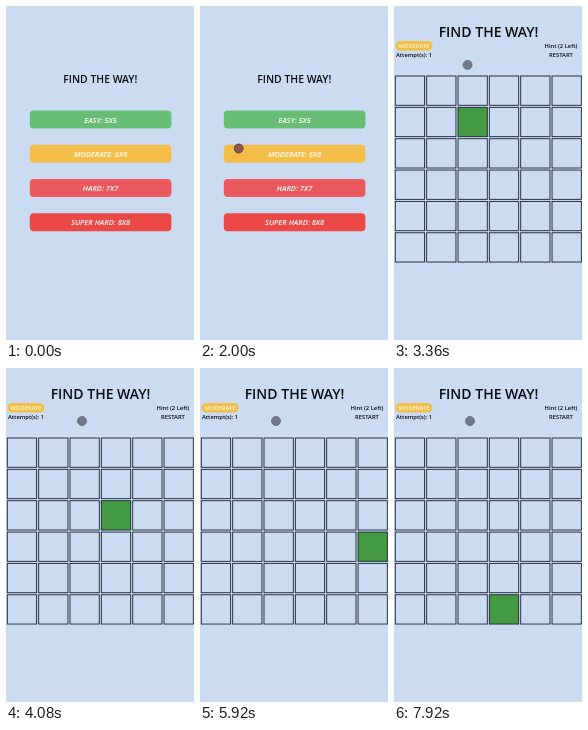
Animation of 188 by 334 pixels, one loop 8 s. Source, as an HTML page:

```html
<!DOCTYPE html>
<html lang="en">
<head>
<meta charset="utf-8">
<title>Find the way</title>
<style>
html, body { margin: 0; width: 100%; height: 100%; overflow: hidden; background: #cbdbf2; }
svg { display: block; width: 100vw; height: 100vh; }
text { font-family: "Open Sans", "Noto Sans", sans-serif; font-weight: 600; fill: #0a0c12; }
.mid { text-anchor: middle; }
.button { font-size: 7.5px; font-style: italic; fill: #fff; }
.small { font-size: 5.8px; }
.badge { fill: #fff6dc; }
.cell { stroke: #1b2230; stroke-width: .9; }
</style>
</head>
<body>
<svg id="stage" viewBox="0 0 188 334">
  <rect width="188" height="334" fill="#cbdbf2"/>
  <g id="menu">
    <text class="mid" x="94.3" y="77.2" font-size="10.4">FIND THE WAY!</text>
  </g>
  <g id="board">
    <text class="mid" x="94.5" y="31" font-size="14">FIND THE WAY!</text>
    <rect x="1.5" y="35" width="37" height="9.6" rx="4.8" fill="#f3bd48"/>
    <text class="mid small badge" x="20" y="42">MODERATE</text>
    <text class="small" x="2" y="51">Attempt(s): 1</text>
    <text class="mid small" x="167" y="42">Hint (2 Left)</text>
    <text class="mid small" x="167" y="51">RESTART</text>
  </g>
  <circle id="cursor" r="4.5" stroke-width=".8"/>
</svg>
<script>
const LOOP = 8000, OPEN = 2080, FIRST = 2500, STEP = 500;
const SIZE = 6, PITCH = 31.35;
const PATH = [[2, 0], [2, 1], [2, 2], [3, 2], [4, 2], [5, 2], [5, 3], [5, 4], [4, 4], [4, 5], [3, 5]];
const LEVELS = [
  ["EASY: 5X5", "#68bd74"],
  ["MODERATE: 6X6", "#f3bd48"],
  ["HARD: 7X7", "#ea5a5c"],
  ["SUPER HARD: 8X8", "#ec4846"]
];
const get = id => document.getElementById(id);
const menu = get("menu"), board = get("board"), cursor = get("cursor");

function add(parent, tag, attrs, label = "") {
  const el = document.createElementNS("http://www.w3.org/2000/svg", tag);
  for (const key in attrs) el.setAttribute(key, attrs[key]);
  el.textContent = label;
  parent.appendChild(el);
  return el;
}

LEVELS.forEach(([label, fill], i) => {
  const y = 104.6 + i * 34.2;
  add(menu, "rect", { x: 23.8, y, width: 141.6, height: 18, rx: 4, fill });
  add(menu, "text", { class: "mid button", x: 94.6, y: y + 12 }, label);
});

const cells = [];
for (let i = 0; i < SIZE * SIZE; i++) {
  const x = 1.3 + (i % SIZE) * PITCH, y = 70 + Math.floor(i / SIZE) * PITCH;
  cells.push(add(board, "rect", { class: "cell", x, y, width: 29.3, height: 29.3 }));
}

// Smooth progress between two times
function ease(t, from, to) {
  const p = Math.min(1, Math.max(0, (t - from) / (to - from)));
  return p * p * (3 - 2 * p);
}
const mix = (a, b, p) => a + (b - a) * p;

function draw(t) {
  const playing = t >= OPEN;
  menu.style.display = playing ? "none" : "";
  board.style.display = playing ? "" : "none";

  const step = Math.min(PATH.length - 1, Math.floor((t - FIRST) / STEP));
  const lit = step < 0 ? -1 : PATH[step][1] * SIZE + PATH[step][0];
  cells.forEach((cell, i) => cell.setAttribute("fill", i === lit ? "#439a43" : "#cbdbf2"));

  const down = ease(t, 960, 1720), away = ease(t, 2720, 3480);
  cursor.style.display = t < 960 ? "none" : "";
  cursor.setAttribute("cx", mix(mix(70, 38.7, down), 76, away));
  cursor.setAttribute("cy", mix(mix(39, 142.5, down), 53, away));
  const overButton = !playing && down > 0.95;
  cursor.setAttribute("fill", overButton ? "#8c5a48" : "#727a8a");
  cursor.setAttribute("stroke", overButton ? "#4d3c38" : "#5f6675");
}

function tick() {
  draw(performance.now() % LOOP);
  requestAnimationFrame(tick);
}
tick();
</script>
</body>
</html>
```
